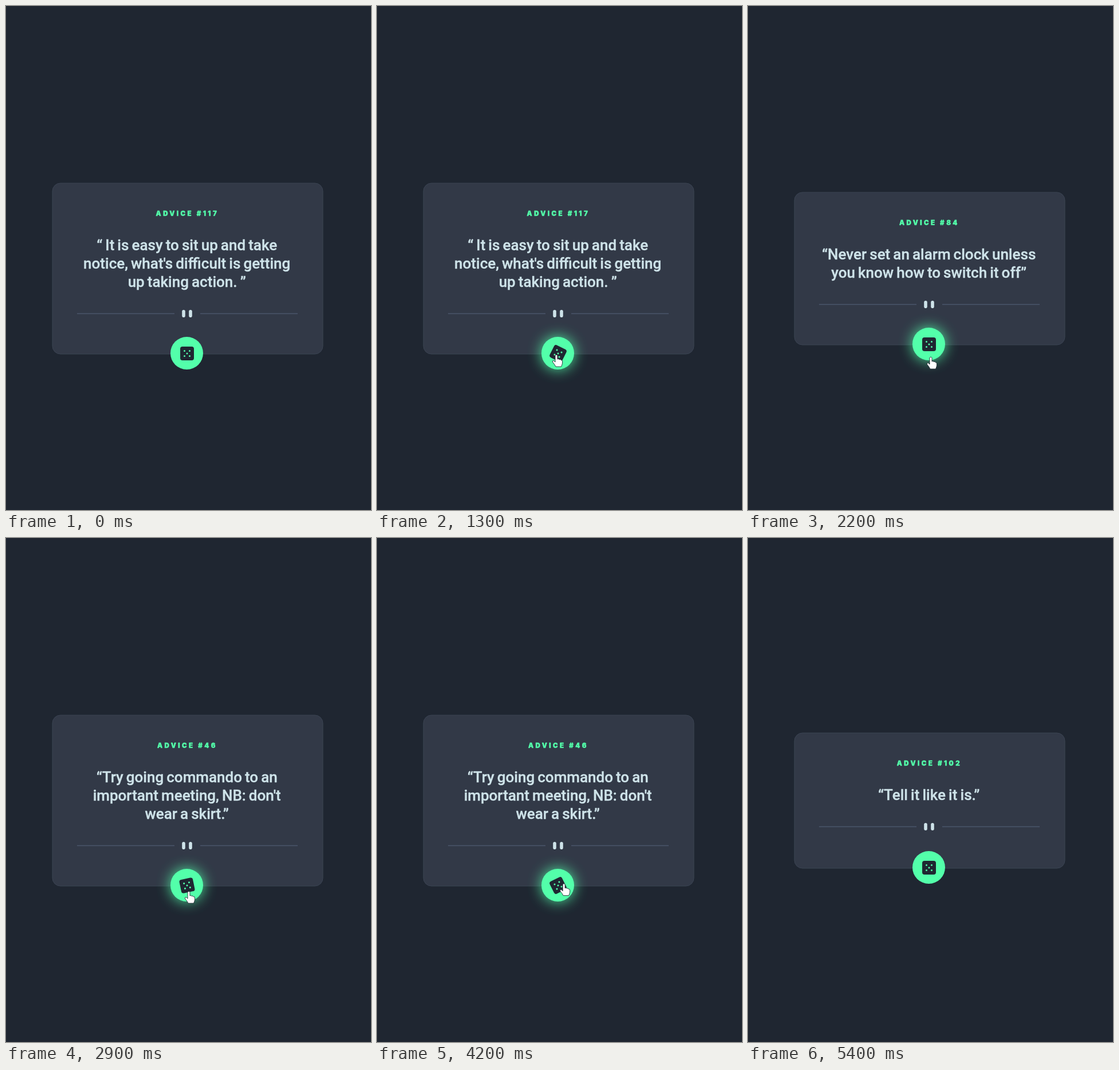
An HTML page that plays this animation: 637x879 px, repeating every 5.9 s.

```html
<!DOCTYPE html>
<html lang="en">
<meta charset="utf-8">
<title>Advice card</title>
<style>
  html, body { margin: 0; height: 100%; overflow: hidden; background: #1f2631; }
  svg { display: block; width: 100vw; height: 100vh; }
  text { text-anchor: middle; }
  #label { font: 900 11.5px Inter, sans-serif; letter-spacing: 3.4px; fill: #53ffaa; stroke: #53ffaa; stroke-width: .4; }
  #quote { font: 500 26px Roboto, sans-serif; word-spacing: -1.4px; fill: #cee3e9; stroke: #cee3e9; stroke-width: .35; }
</style>
<svg viewBox="0 0 637 879">
  <filter id="blur" x="-150%" y="-150%" width="400%" height="400%">
    <feGaussianBlur stdDeviation="12"/>
  </filter>
  <rect id="card" x="81" width="472" rx="14" fill="#323947" stroke="#3b4453"/>
  <g id="content">
    <text id="label" x="316.4" y="57"></text>
    <text id="quote"></text>
  </g>
  <g id="divider">
    <path d="M124 0H294M339 0H509" stroke="#4a566b" stroke-width="1.4"/>
    <path d="M310-3.7V3.7M322-3.7V3.7" stroke="#cee3e9" stroke-width="5.6" stroke-linecap="round"/>
  </g>
  <g id="button">
    <circle id="glow" r="28.5" fill="#53ffaa" opacity=".9" filter="url(#blur)"/>
    <circle r="28.5" fill="#53ffaa"/>
    <g id="dice">
      <rect x="-12" y="-12" width="24" height="24" rx="4" fill="#1f2631"/>
      <path d="M-4.5-4.5h0M4.5-4.5h0M0 0h0M-4.5 4.5h0M4.5 4.5h0" stroke="#53ffaa" stroke-width="3" stroke-linecap="round"/>
    </g>
  </g>
  <g id="cursor" stroke-linejoin="round">
    <path id="hand" fill="#fff" stroke="#222b35" stroke-width=".9"
      d="M-2 1.5Q0-1.5 2 1.5V8Q4 6.5 5 8.5Q7.5 7.5 8 9.5Q10.5 9 10.5 12V15Q10 18 8.5 21H-1Q-3 17-6.5 13Q-7 10-4.5 10.5L-2 13Z"/>
    <path id="arrow" fill="#000" stroke="#fff" d="M0 0V15L3.5 11.8 5.8 17 8.2 16 5.9 11H10.5Z"/>
  </g>
</svg>
<script>
const LOOP = 5900, STEP = 100, SPIN = 600;
const $ = id => document.getElementById(id);

const slides = [
  { at: 0, id: 117, lines: ["“ It is easy to sit up and take", "notice, what's difficult is getting", "up taking action. ”"] },
  { at: 2000, id: 84, lines: ["“Never set an alarm clock unless", "you know how to switch it off”"] },
  { at: 2700, id: 46, lines: ["“Try going commando to an", "important meeting, NB: don't", "wear a skirt.”"] },
  { at: 4400, id: 92, lines: ["“You can have too much of a good", "thing.”"] },
  { at: 5200, id: 102, lines: ["“Tell it like it is.”"] },
];
const clicks = [1200, 2365, 3700, 4720];
// time, x, y of the pointer tip
const path = [
  [400, 415, 812], [900, 316, 612], [1300, 313, 608], [1800, 319, 612], [2200, 319, 612],
  [2900, 319, 616], [3500, 327, 621], [4300, 326, 600], [4800, 326, 600], [5400, 470, 900],
];

const smooth = p => p * p * (3 - 2 * p);
const move = (id, x, y) => $(id).setAttribute("transform", `translate(${x} ${y})`);
const show = (id, on) => $(id).setAttribute("visibility", on ? "visible" : "hidden");

function pointerAt(t) {
  const i = path.findIndex(p => p[0] > t);
  if (i < 1) return null;
  const [t0, x0, y0] = path[i - 1], [t1, x1, y1] = path[i];
  const p = (t - t0) / (t1 - t0);
  return { x: x0 + (x1 - x0) * p, y: y0 + (y1 - y0) * p };
}

let current;
function showSlide(slide) {
  if (slide === current) return;
  current = slide;
  $("label").textContent = "ADVICE #" + slide.id;
  $("quote").innerHTML = slide.lines
    .map((line, i) => `<tspan x="315.7" y="${117 + 32 * i}">${line}</tspan>`).join("");
}

function draw(now) {
  const t = Math.floor(now % LOOP / STEP) * STEP;
  const slide = slides.findLast(s => s.at <= t);
  const rows = slide.lines.length;
  const top = [340, 325, 309][rows - 1], bottom = [576, 591, 607][rows - 1];
  const button = { x: 315.5, y: bottom - 1.5 };

  showSlide(slide);
  $("card").setAttribute("y", top);
  $("card").setAttribute("height", bottom - top);
  move("content", 0, top);
  move("divider", 0, top + 131.5 + 32 * rows);
  move("button", button.x, button.y);

  const click = clicks.find(c => t >= c && t < c + SPIN);
  const angle = click ? 360 * smooth((t - click) / SPIN) : 0;
  $("dice").setAttribute("transform", `translate(.5 .5) rotate(${angle})`);

  const tip = pointerAt(t);
  const hover = tip && Math.hypot(tip.x - button.x, tip.y - button.y) < 28.5;
  if (tip) move("cursor", tip.x, tip.y);
  show("hand", hover);
  show("arrow", tip && !hover);
  show("glow", hover);
}

const start = performance.now();
function tick() {
  draw(performance.now() - start);
  requestAnimationFrame(tick);
}
tick();
</script>
</html>
```
